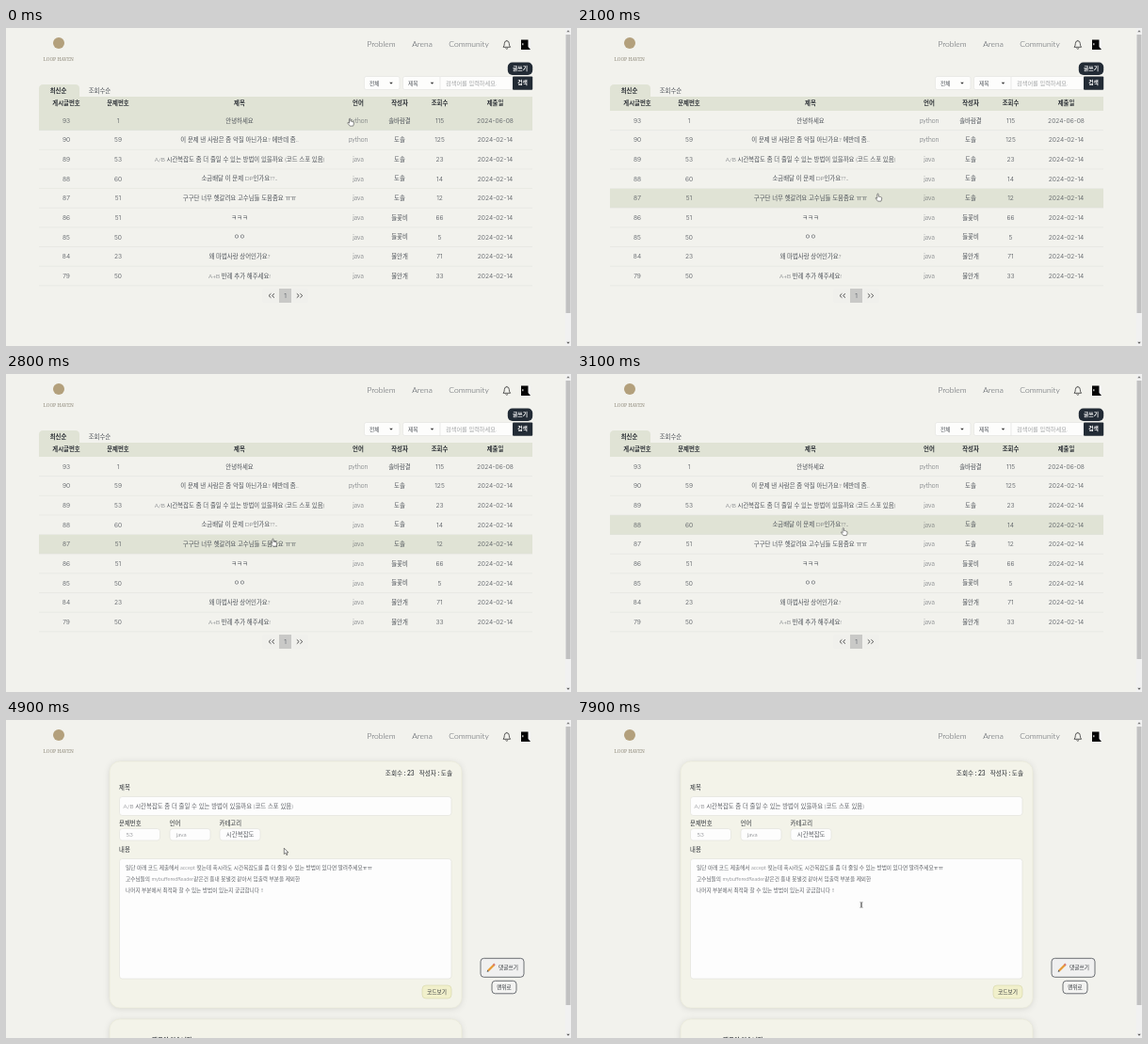
Recreate the animation shown at these times as an HTML page. Size 600 by 338 pixels, loop 8 s.

```html
<!DOCTYPE html>
<html lang="ko">
<head>
<meta charset="utf-8">
<style>
html, body { margin: 0; width: 100%; height: 100%; overflow: hidden; background: #f2f2ed; }
svg { display: block; width: 600px; height: 338px; }
text { font-family: Lato, "Noto Sans CJK KR", "Noto Sans CJK", sans-serif; fill: #4c5158; white-space: pre; }
.thin { font-weight: 300; }
.num { font-family: Inter, Roboto, sans-serif; font-weight: 300; }
.crisp { shape-rendering: crispEdges; }
</style>
</head>
<body>
<svg id="stage" viewBox="0 0 600 338">
  <g id="top"></g>
  <g id="list"></g>
  <g id="post"></g>
  <g id="hand"><path transform="scale(.85)" d="M0 .6Q0-.4.8-.4T1.6.6V3.2Q2.6 2.5 3.2 3.5 4.2 3 4.6 4 5.7 3.7 5.7 5V6.5L4.8 9H.8L-1.9 5.5Q-2.2 4.3-1 4.6L0 5.6Z" fill="#fff" stroke="#444" stroke-width=".7" stroke-linejoin="round"/></g>
  <path id="arrow" d="M0 0V6.3L1.5 5 2.6 7.4 3.7 6.9 2.6 4.6H4.6Z" fill="#fff" stroke="#333" stroke-width=".6"/>
  <path id="beam" d="M-1.4-2.8Q0-2.8 0-2V2Q0 2.8-1.4 2.8M1.4-2.8Q0-2.8 0-2V2Q0 2.8 1.4 2.8" fill="none" stroke="#444" stroke-width=".7"/>
</svg>
<script>
const $ = id => document.getElementById(id);
const TINT = '#e0e3d5', DARK = '#222b35';
const ROW_TOP = 88, ROW_H = 20.65, SWITCH = 4300, LOOP = 8000;

// y is the vertical middle of the line
const text = (x, y, s, size = 6.4, attrs = '') =>
  `<text x="${x}" y="${y + size * .36}" font-size="${size}" ${attrs}>${s}</text>`;
const mid = (x, y, s, size, attrs = '') => text(x, y, s, size, 'text-anchor="middle" ' + attrs);
const box = (x, y, w, h, fill, r = 0, stroke = 'none', sw = .6) =>
  `<rect x="${x}" y="${y}" width="${w}" height="${h}" rx="${r}" fill="${fill}" stroke="${stroke}" stroke-width="${sw}"/>`;
const path = (d, fill = 'none', stroke = '#333', sw = .8) =>
  `<path d="${d}" fill="${fill}" stroke="${stroke}" stroke-width="${sw}"/>`;
const bold = 'font-weight="700" style="fill:#2c3036"';
const white = 'font-weight="700" style="fill:#fff"';
const medium = 'font-weight="500" style="fill:#2c3036"';
const thin = 'class="thin"', num = 'class="num"';

$('top').innerHTML =
  '<circle cx="56" cy="16" r="6" fill="#b3a07c"/>' +
  mid(55.7, 33, 'LOOP HAVEN', 5, 'style="font-family:\'Noto Serif\',serif;fill:#8d8778"') +
  [[398.5, 'Problem'], [442, 'Arena'], [491.5, 'Community']].map(([x, s]) => mid(x, 17.3, s, 8.5, thin)).join('') +
  path('M528 20.3Q529.3 19 529.3 16.5A2.5 2.8 0 0 1 534.3 16.5Q534.3 19 535.6 20.3ZM530.5 21.5Q531.8 23 533.1 21.5M531.8 13.7V12.9') +
  box(547, 12.5, 10, 10.5, '#fafafa', 1) + path('M547 12.5H554.5V20L557 23H547Z', '#050505', 'none') +
  box(548.2, 16.2, 1.2, 2, '#ddd') +
  box(594, 0, 6, 338, '#f1f1f1') + box(594.5, 7, 5, 296, '#c1c1c1') +
  path('M595.3 4.2L597 2.2 598.7 4.2Z', '#777', 'none') + path('M595.3 333.8L597 335.8 598.7 333.8Z', '#555', 'none');

const TITLE = 'A/B 시간복잡도 좀 더 줄일 수 있는 방법이 있을까요 (코드 스포 있음)';
const cols = [64, 119, 248, 374, 418, 460.5, 519.5];
const heads = ['게시글번호', '문제번호', '제목', '언어', '작성자', '조회수', '제출일'];
const feb = '2024-02-14';
const rows = [
  [93, 1, '안녕하세요', 'python', '솔바람결', 115, '2024-06-08'],
  [90, 59, '이 문제 낸 사람은 좀 악질 아닌가요? 에반데 좀..', 'python', '도솔', 125, feb],
  [89, 53, TITLE, 'java', '도솔', 23, feb],
  [88, 60, '소금배달 이 문제 DP인가요??..', 'java', '도솔', 14, feb],
  [87, 51, '구구단 너무 헷갈려요 고수님들 도움좀요 ㅠㅠ', 'java', '도솔', 12, feb],
  [86, 51, 'ㅋㅋㅋ', 'java', '들꽃비', 66, feb],
  [85, 50, 'ㅇㅇ', 'java', '들꽃비', 5, feb],
  [84, 23, '왜 마법사랑 상어인가요?', 'java', '물안개', 71, feb],
  [79, 50, 'A+B 반례 추가 해주세요!', 'java', '물안개', 33, feb]
];
const cell = (s, c, y) => /^\d/.test(s) ? mid(cols[c], y, s, 6.7, num) : mid(cols[c], y, s, c === 3 ? 6.8 : 6.4, thin);
const caret = x => path(`M${x - 1.8} 57.8H${x + 1.8}L${x} 59.8Z`, '#333', 'none');
const chevrons = (x, d) => path([0, 3.6].map(o => `M${x + o + d} 282.3L${x + o - d} 284.5L${x + o + d} 286.7`).join(''), 'none', '#333', .8);

$('list').innerHTML =
  box(532.8, 36.5, 26.4, 13.5, DARK, 5) + mid(546, 43.3, '글쓰기', 5.8, white) +
  box(380.5, 51.5, 37.5, 14, '#fdfdfc', 2, '#e3e3df') + text(386, 58.5, '전체', 5.7) + caret(409) +
  box(421.5, 51.5, 117, 14, '#fdfdfc', 2, '#e3e3df') + text(427, 58.5, '제목', 5.7) + caret(452.5) +
  path('M461 52V65.5', 'none', '#e0e0dc', .6) +
  text(467, 58.5, '검색어를 입력하세요.', 6.2, 'class="thin" style="fill:#a2a4a6"') +
  box(538, 51.5, 21.2, 14.2, DARK, 1) + mid(548.5, 58.3, '검색', 5.8, white) +
  path('M35 73V64.5Q35 60 39.5 60H73.5Q78 60 78 64.5V73Z', TINT, 'none') +
  mid(55.5, 67, '최신순', 6.4, bold) + mid(99.5, 67, '조회수순', 6.4, thin) +
  box(35, 73, 524, 15, TINT) +
  `<rect id="hover" class="crisp" x="35" width="524" height="${ROW_H}" fill="${TINT}"/>` +
  heads.map((h, i) => mid(cols[i], 79.5, h, 6.4, bold)).join('') +
  rows.map((r, i) => {
    const y = ROW_TOP + ROW_H * i;
    return path(`M35 ${y + ROW_H}H559`, 'none', '#e1e3de', .6) +
      r.map((s, c) => cell(s, c, y + 10.2)).join('');
  }).join('') +
  box(272, 277, 49, 15, '#f0f0ec', 2) + box(290, 277, 13, 15, '#c9c9c7') + mid(296.5, 284.5, '1', 6.7, num) +
  chevrons(280.2, 1.2) + chevrons(310, -1.2);

const field = (x, y, w, h) => box(x, y, w, h, '#fdfdfd', 3, '#e0e0d8');
const gray = 'class="thin" style="fill:#5d6066"';
const lines = [
  '일단 아래 코드 제출해서 accept 떳는데 혹시라도 시간복잡도를 좀 더 줄일 수 있는 방법이 있다면 알려주세요ㅠㅠ',
  '고수님들의 mybufferedReader같은건 흉내 못낼것 같아서 입출력 부분을 제외한',
  '나머지 부분에서 최적화 할 수 있는 방법이 있는지 궁금합니다 !!'
];
const card = (y, h) =>
  `<g style="filter:drop-shadow(0 1px 3px #0000001c)">${box(110, y, 374, h, '#f3f3e9', 11, '#e8e8d6')}</g>`;

$('post').innerHTML =
  card(44, 262) + card(318, 60) +
  text(474, 56.3, '조회수 : 23   작성자 : 도솔', 6.6, 'text-anchor="end" ' + medium) +
  text(120, 72, '제목', 6.4, medium) + field(120.5, 81.5, 352.5, 20) + text(124.5, 91.5, TITLE, 6.4, gray) +
  [[120, '문제번호', '53'], [173.5, '언어', 'java'], [226.5, '카테고리', '시간복잡도']].map(([x, label, s]) =>
    text(x, 110, label, 6.4, medium) + field(x + .5, 115.5, 43, 12.5) + text(x + 7.2, 121.8, s, 6.5, gray)).join('') +
  text(120, 138, '내용', 6.4, medium) + field(120.5, 147.5, 352.5, 127.5) +
  lines.map((s, i) => text(127, 157 + 12 * i, s, 5.65, gray)).join('') +
  box(442, 282, 31, 14, '#f1f0cb', 4, '#d6d5a8') + mid(457.5, 289, '코드보기', 5.7, medium) +
  box(504, 253.3, 46, 20, '#f0f0f0', 3.5, '#4b4f55', .8) +
  path('M512 266.5L518.2 260.2', 'none', '#e79a35', 2.2) + path('M517.6 260.8L519 259.4', 'none', '#d97a72', 2.2) +
  path('M510.7 267.8L511.2 265.7 512.8 267.3Z', '#444', 'none') +
  mid(533.5, 263, '댓글쓰기', 5.7, medium) +
  box(516, 277.3, 26, 13.5, '#f3f3f1', 3.5, '#4b4f55', .8) + mid(529, 284, '맨위로', 5.7, medium) +
  text(155, 340.3, '댓글이 없습니다.', 6.4, bold);

// pointer hot spot: time, x, y
const track = [
  [0, 364.5, 96.5], [1600, 318, 108.4], [2100, 318.8, 176.5], [2800, 282.8, 175.5],
  [3700, 280.3, 131.2], [SWITCH, 280.3, 132], [4900, 295.3, 136.2], [5900, 302, 196.5], [LOOP, 302, 196.5]
];

function pointer(t) {
  const i = track.findIndex(k => k[0] > t);
  const [t0, x0, y0] = track[i - 1], [t1, x1, y1] = track[i];
  const u = (t - t0) / (t1 - t0), e = u * u * (3 - 2 * u);
  return [x0 + (x1 - x0) * e, y0 + (y1 - y0) * e];
}

const show = (id, on) => $(id).style.display = on ? '' : 'none';

function draw(now) {
  const t = now % LOOP, [x, y] = pointer(t);
  const reading = t >= SWITCH, typing = reading && y > 147;
  show('list', !reading);
  show('post', reading);
  $('hover').setAttribute('y', ROW_TOP + ROW_H * Math.floor((y - ROW_TOP) / ROW_H));
  for (const [id, on] of [['hand', !reading], ['arrow', reading && !typing], ['beam', typing]]) {
    show(id, on);
    $(id).setAttribute('transform', `translate(${x} ${y})`);
  }
  requestAnimationFrame(draw);
}
draw(0);
</script>
</body>
</html>
```
